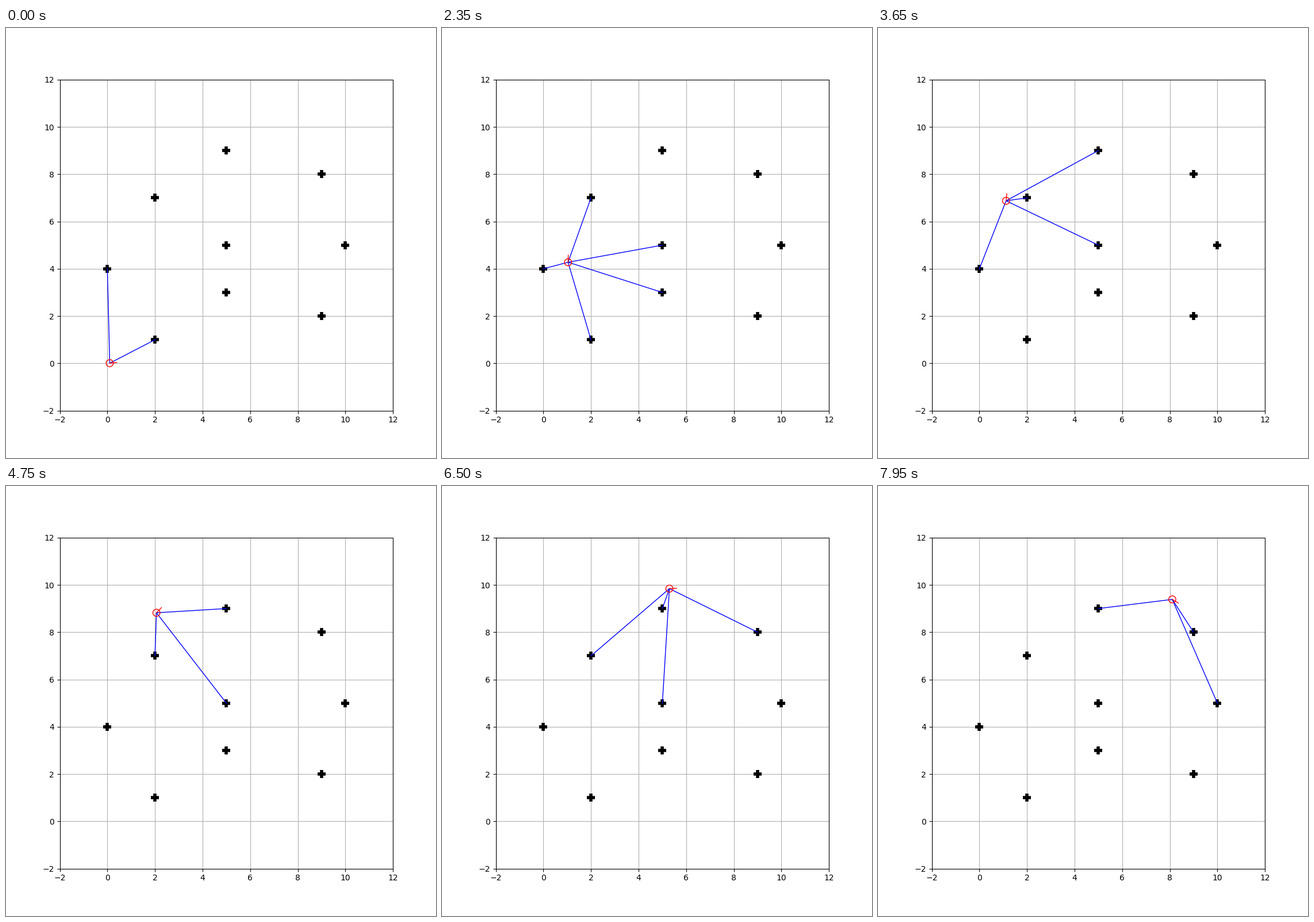
Write a matplotlib script that moves like this. It is 748 by 748 pixels and loops after 8 s.

```python
import numpy as np
import matplotlib.pyplot as plt
from matplotlib.animation import FuncAnimation

FRAMES, INTERVAL = 160, 50
STEP = 0.1        # distance travelled per frame
REACH = 5.0       # sensor range
RADIUS = 0.15     # robot body

LANDMARKS = np.array([(0, 4), (2, 1), (2, 7), (5, 3), (5, 5),
                      (5, 9), (9, 2), (9, 8), (10, 5)], float)

# Heading: sharp left turn, straight, wide right turn, straight, right again.
TURN_STEPS = [0, 15.44, 71.4, 121.7, 141, 161]
TURN_ANGLES = [0, 1.544, 1.544, 0.035, 0.035, -0.565]

heading = np.interp(np.arange(1, FRAMES + 1), TURN_STEPS, TURN_ANGLES)
direction = np.column_stack([np.cos(heading), np.sin(heading)])
path = np.cumsum(STEP * direction, axis=0)

fig, ax = plt.subplots(figsize=(7.48, 7.48), dpi=100)
ax.set_xlim(-2, 12)
ax.set_ylim(-2, 12)
ax.grid(True)
ax.plot(*LANDMARKS.T, "k+", markersize=10, markeredgewidth=4)

rays = [ax.plot([], [], "b-", lw=1)[0] for _ in LANDMARKS]
body = ax.add_patch(plt.Circle((0, 0), RADIUS, fill=False, ec="r", lw=1, zorder=2))
nose, = ax.plot([], [], "r-", lw=1)


def segment(line, start, end):
    line.set_data([start[0], end[0]], [start[1], end[1]])


def update(frame):
    pos = path[frame]
    for ray, mark in zip(rays, LANDMARKS):
        segment(ray, pos, mark)
        ray.set_visible(np.hypot(*(mark - pos)) < REACH)
    body.center = tuple(pos)
    segment(nose, pos, pos + 2 * RADIUS * direction[frame])
    return [*rays, body, nose]


anim = FuncAnimation(fig, update, frames=FRAMES, interval=INTERVAL,
                     repeat=True, repeat_delay=0, blit=False)
plt.show()
```
